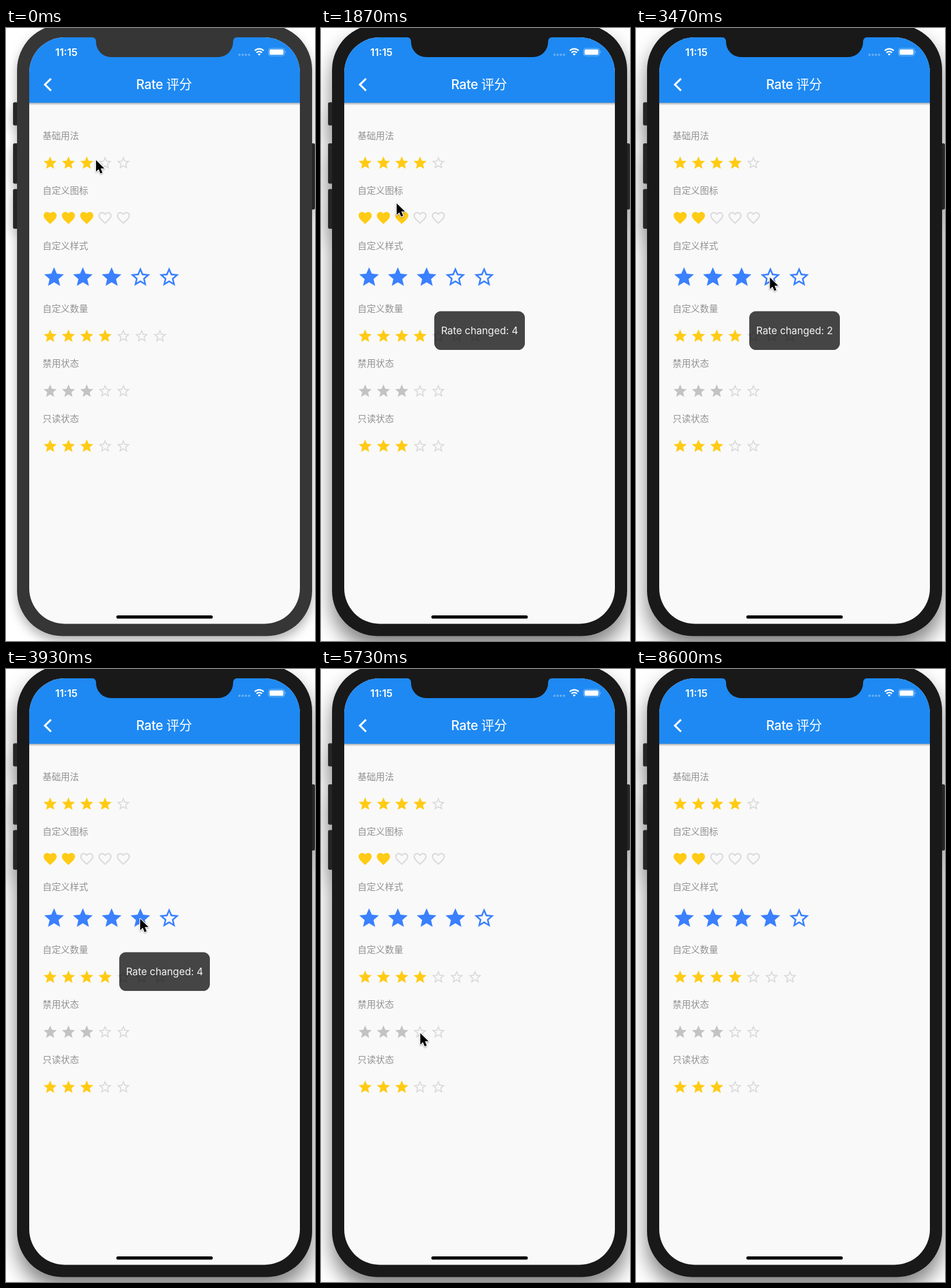
Recreate the animation shown at these times as an HTML page. Size 532 px wide and 1053 px high, loop 8630 ms.

```html
<!DOCTYPE html>
<html lang="zh-CN">
<head>
<meta charset="utf-8">
<title>Rate</title>
<style>
  html, body { margin: 0; width: 100%; height: 100%; overflow: hidden; background: #fff; }
  svg { display: block; width: 100vw; height: 100vh; }
  text { font-family: Inter, "Noto Sans CJK SC", "Noto Sans CJK", sans-serif; }
  #phone { fill: #363636; filter: drop-shadow(0 9px 9px rgba(0, 0, 0, .3)); }
  #phone.active { fill: #191919; filter: drop-shadow(0 20px 17px rgba(0, 0, 0, .5)); }
  .keys { fill: #252525; stroke: #3a3a3a; }
  .notch { fill: #363636; }
  .active ~ .screen .notch { fill: #191919; }
  .label { font-size: 15.7px; fill: #929292; }
</style>
</head>
<body>
<svg viewBox="0 0 532 1053">
  <defs>
    <clipPath id="glass"><rect x="40" y="16" width="466" height="1007.5" rx="61"/></clipPath>
    <linearGradient id="edge" x2="0" y2="1">
      <stop stop-opacity=".32"/><stop offset="1" stop-opacity="0"/>
    </linearGradient>
  </defs>

  <g id="phone">
    <g class="keys">
      <rect x="12.5" y="128" width="12" height="39" rx="2"/>
      <rect x="12.5" y="198.500" width="12" height="68.500" rx="2"/>
      <rect x="12.5" y="277" width="12" height="67.500" rx="2"/>
      <rect x="521" y="198.500" width="10.500" height="113" rx="2"/>
    </g>
    <rect x="19" y="-6" width="508" height="1050.500" rx="78"/>
  </g>

  <g class="screen" clip-path="url(#glass)">
    <rect x="40" y="16" width="466" height="1008" fill="#f9f9f9"/>
    <rect x="40" y="128" width="466" height="5" fill="url(#edge)"/>
    <rect x="40" y="16" width="466" height="112.500" fill="#1e89f2"/>
    <path class="notch" d="M148 15V16q7 0 7 8a26 26 0 0 0 26 26H365a26 26 0 0 0 26-26q0-8 7-8V15z"/>
    <g fill="#fff">
      <text x="104" y="47.500" font-size="17.500" font-weight="600" text-anchor="middle">11:15</text>
      <text x="272" y="105" font-size="22.300" font-weight="500" text-anchor="middle" letter-spacing="-.3">Rate 评分</text>
      <path d="M77.500 87L67 97.300l10.500 10.300" fill="none" stroke="#fff" stroke-width="3.300"/>
      <g opacity=".32">
        <circle cx="402" cy="46" r="2"/><circle cx="407.500" cy="46" r="2"/>
        <circle cx="413" cy="46" r="2"/><circle cx="418.500" cy="46" r="2"/>
      </g>
      <path d="M428.300 39a10.900 10.900 0 0 1 15.400 0M431.300 42.300a6.600 6.600 0 0 1 9.400 0" fill="none" stroke="#fff" stroke-width="2.400"/>
      <path d="M433.500 44.800a3.400 3.400 0 0 1 5 0l-2.500 2.600z"/>
      <rect x="452" y="35" width="27.500" height="12.800" rx="3.600" fill="none" stroke="#fff" stroke-opacity=".45"/>
      <rect x="453.700" y="36.700" width="24" height="9.400" rx="2.200"/>
      <path d="M480.700 39.300q2 2.100 0 4.300z" opacity=".5"/>
    </g>
    <g id="rows"></g>
    <rect x="190" y="1009" width="166" height="5.600" rx="2.800"/>
  </g>

  <g id="toast">
    <rect x="195" y="486.500" width="156" height="66.500" rx="11.500" fill-opacity=".72"/>
    <text id="message" x="273" y="526" font-size="17.200" fill="#f5f5f5" text-anchor="middle"></text>
  </g>

  <g id="cursor" style="filter:drop-shadow(0 1px 1px rgba(0,0,0,.35))">
    <path d="M0 0V19.800l4.500-4.200 3.100 7.300 3.500-1.500L8 14.200h6.300z" stroke="#fff" stroke-width="2.400" paint-order="stroke" stroke-linejoin="round"/>
  </g>
</svg>

<script>
const LOOP = 8630, PT = 466 / 414, FOCUS_AT = 700, CURSOR_HIDE_AT = 7600;
const GOLD = '#ffcb14', BLUE = '#3a80ff', SILVER = '#c2c3c5', EMPTY = '#dadada';

const star = 'M12 17.27L18.18 21l-1.64-7.03L22 9.24l-7.19-.61L12 2 9.19 8.63 2 9.24l5.46 4.73L5.82 21z';
const heart = 'M12 21.35l-1.45-1.32C5.4 15.36 2 12.28 2 8.5 2 5.42 4.42 3 7.5 3c1.74 0 3.41.81 4.5 2.09C13.09 3.81 14.76 3 16.5 3 19.58 3 22 5.42 22 8.5c0 3.78-3.4 6.86-8.55 11.54z';
const starHole = 'M12 15.4l-3.76 2.27 1-4.28-3.32-2.88 4.38-.38L12 6.1l1.71 4.04 4.38.38-3.32 2.88 1 4.28z';
const heartHole = 'M12 18.65C7.14 14.24 4 11.39 4 8.5 4 6.5 5.5 5 7.5 5c1.54 0 3.04.99 3.57 2.36h1.87C13.46 5.99 14.96 5 16.5 5c2 0 3.5 1.5 3.5 3.5 0 2.89-3.14 5.74-8 10.15z';

// Sizes are in points; y is the middle of the icons.
const rows = [
  { label: '基础用法', labelY: 185, y: 231.7, value: 3, color: GOLD },
  { label: '自定义图标', labelY: 279.5, y: 326.2, value: 3, color: GOLD, shape: heart, hole: heartHole },
  { label: '自定义样式', labelY: 374, y: 427.8, value: 3, color: BLUE, empty: BLUE, size: 36, step: 44 },
  { label: '自定义数量', labelY: 482, y: 529, value: 4, color: GOLD, count: 7 },
  { label: '禁用状态', labelY: 576, y: 623.5, value: 3, color: SILVER },
  { label: '只读状态', labelY: 671, y: 718, value: 3, color: GOLD }
];
const ratings = [
  { at: 1060, row: 0, value: 4 },
  { at: 2250, row: 1, value: 2 },
  { at: 3690, row: 2, value: 4 }
];
const TOAST_DELAY = 65, TOAST_TIME = 1500, FADE = 150;

// Cursor tip as [time, x, y]
const route = [
  [0, 155, 227], [250, 155, 227], [800, 167, 233], [1400, 167, 233],
  [2100, 118, 324], [2700, 118, 324], [3500, 231, 429], [4350, 231, 429],
  [5050, 192, 568], [5250, 192, 568], [5800, 170, 628], [LOOP, 170, 628]
];

const $ = id => document.getElementById(id);
const clamp = v => Math.max(0, Math.min(1, v));
const ease = v => v * v * (3 - 2 * v);

function add(parent, tag, attrs) {
  const el = document.createElementNS('http://www.w3.org/2000/svg', tag);
  for (const key in attrs) el.setAttribute(key, attrs[key]);
  return parent.appendChild(el);
}

for (const row of rows) {
  const { size = 24, step = 28, count = 5 } = row;
  add($('rows'), 'text', { class: 'label', x: 63, y: row.labelY + 5.8 }).textContent = row.label;
  row.icons = Array.from({ length: count }, (_, i) => add($('rows'), 'path', {
    'fill-rule': 'evenodd',
    transform: `translate(${62.5 + i * step * PT} ${row.y - size * PT / 2}) scale(${size * PT / 24})`
  }));
}

function paintRow(row, value) {
  const { shape = star, hole = starHole, empty = EMPTY } = row;
  row.icons.forEach((icon, i) => {
    icon.setAttribute('d', i < value ? shape : shape + hole);
    icon.setAttribute('fill', i < value ? row.color : empty);
  });
}

function paintToast(t) {
  const current = ratings.filter(r => t >= r.at + TOAST_DELAY).pop();
  const age = current ? t - current.at - TOAST_DELAY : TOAST_TIME;
  $('toast').setAttribute('opacity', clamp(Math.min(age, TOAST_TIME - age) / FADE));
  if (current) $('message').textContent = 'Rate changed: ' + current.value;
}

function paintCursor(t) {
  const i = route.findIndex(p => p[0] > t);
  const [t0, x0, y0] = route[i - 1], [t1, x1, y1] = route[i];
  const k = ease((t - t0) / (t1 - t0));
  $('cursor').setAttribute('transform', `translate(${x0 + (x1 - x0) * k} ${y0 + (y1 - y0) * k})`);
  $('cursor').setAttribute('visibility', t < CURSOR_HIDE_AT ? 'visible' : 'hidden');
}

function draw() {
  const t = performance.now() % LOOP;
  $('phone').classList.toggle('active', t >= FOCUS_AT);
  rows.forEach((row, i) => {
    const rated = ratings.find(r => r.row === i && t >= r.at);
    paintRow(row, rated ? rated.value : row.value);
  });
  paintToast(t);
  paintCursor(t);
  requestAnimationFrame(draw);
}
draw();
</script>
</body>
</html>
```
